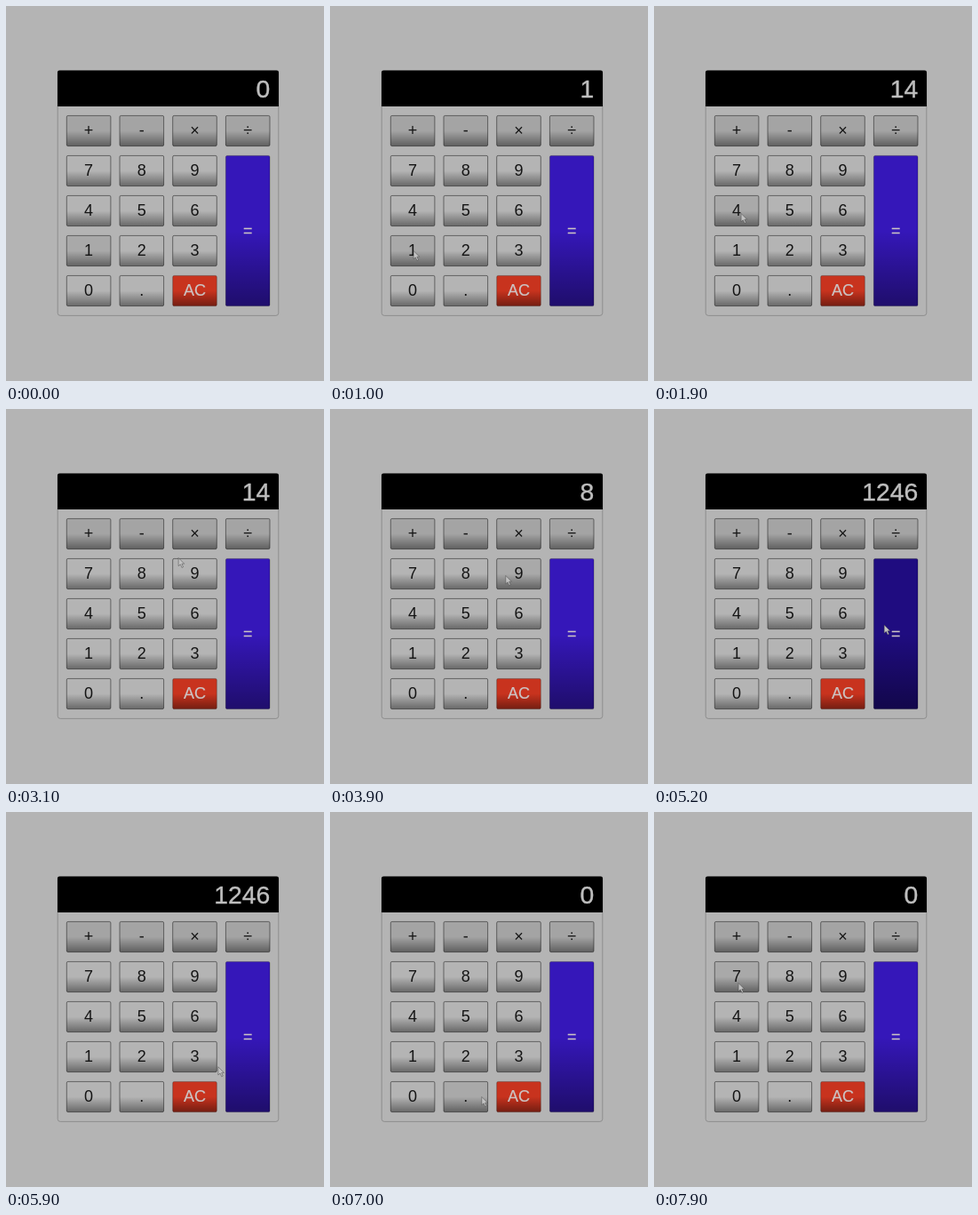
Write an HTML page that moves like this. It is 358 px wide and 422 px high and loops after 8 s.

```html
<!DOCTYPE html>
<html lang="en">
<head>
<meta charset="utf-8">
<title>Calculator</title>
<style>
html, body { margin: 0; width: 100%; height: 100%; overflow: hidden; background: #b4b4b4; }
svg { display: block; width: 358px; height: 422px; }
text { font-family: "Liberation Sans", Arial, sans-serif; font-size: 18px; text-anchor: middle; fill: #151515; }
#display { font-size: 28.3px; text-anchor: end; fill: #bebebe; stroke: #bebebe; stroke-width: .4px; }
.edge { stroke: #000; stroke-opacity: .55; stroke-width: .85px; }
.light .edge { stroke-opacity: .3; }
.light text { fill: #ccc4c4; stroke: #ccc4c4; stroke-width: .2px; }
</style>
</head>
<body>
<svg viewBox="0 0 358 422">
  <defs>
    <linearGradient id="shade" x1="0" y1="0" x2="0" y2="1">
      <stop offset=".5" stop-color="#000" stop-opacity="0"/>
      <stop offset="1" stop-color="#000" stop-opacity=".42"/>
    </linearGradient>
  </defs>
  <rect width="358" height="422" fill="#b4b4b4"/>
  <rect x="58.2" y="73" width="248.6" height="275.4" rx="3" fill="#b4b4b4" stroke="#858585" stroke-width=".8"/>
  <path d="M58 113V74.5q0-2 2-2h245q2 0 2 2V113z" fill="#000"/>
  <text id="display" x="297.2" y="102.8"></text>
  <g id="keys"></g>
  <path id="cursor" d="M0 0V9.2L2.2 7.3L3.9 11L5.4 10.3L3.8 6.7H6.6z"
        fill="#c2c2c2" stroke="#333" stroke-opacity=".7" stroke-width=".6" stroke-linejoin="round"/>
</svg>
<script>
const LOOP = 8000, STEP = 100, SHOW_CURSOR = 600;
const NS = "http://www.w3.org/2000/svg";
const $ = id => document.getElementById(id);

// face colour: idle, hovered
const colors = {
  digit: ["#b4b4b4", "#a9a9a9"],
  op: ["#a4a4a4", "#a4a4a4"],
  clear: ["#c8331e", "#8e2415"],
  equal: ["#3517b9", "#1f0c80"]
};

function add(parent, tag, attrs) {
  const node = document.createElementNS(NS, tag);
  for (const name in attrs) node.setAttribute(name, attrs[name]);
  return parent.appendChild(node);
}

const keys = {};

function makeKey(label, col, row, type, rows = 1) {
  const x = 68.3 + col * 59.7, y = 123.4 + row * 45;
  const w = 49.6, h = 34.2 + (rows - 1) * 45;
  const cx = x + w / 2, cy = y + h / 2;
  const light = type === "clear" || type === "equal";
  const g = add($("keys"), "g", { class: light ? "light" : "" });
  const box = { x, y, width: w, height: h, rx: 1.5 };
  const face = add(g, "rect", box);
  add(g, "rect", { ...box, class: "edge", fill: "url(#shade)" });
  add(g, "text", { x: cx, y: cy + 5.6 }).textContent = label;
  const contains = (px, py) => Math.abs(px - cx) <= w / 2 && Math.abs(py - cy) <= h / 2;
  keys[label] = { cx, cy, face, type, contains };
}

["+-×÷", "789", "456", "123", "0."].forEach((line, row) =>
  [...line].forEach((label, col) => makeKey(label, col, row, row ? "digit" : "op")));
makeKey("AC", 2, 4, "clear");
makeKey("=", 3, 1, "equal", 4);

// The pointer rests on a key, off its centre by dx and dy, between arrive and leave.
const stop = (label, dx, dy, arrive, leave, press) =>
  ({ label, x: keys[label].cx + dx, y: keys[label].cy + dy, arrive, leave, press });

const stops = [
  stop("1", 1, 0, 0, 1500, 900),
  stop("4", 5, 3, 1900, 2100, 1900),
  stop("×", 0, 7, 2800, 3000, 2800),
  stop("8", 23, 2, 3200, 3700, 3400),
  stop("9", -7, 2, 4000, 4100, 4000),
  stop("=", -13, -10, 4400, 5700, 4900),
  stop("AC", 6, 10, 6100, 6800, 6300),
  stop(".", 18, 0, 7000, 7100),
  stop("7", 2, 7, 7900, LOOP)
];

function pointerAt(t) {
  const i = stops.findIndex(s => t <= s.leave);
  const to = stops[i], from = stops[i - 1] || to;
  const k = t >= to.arrive ? 1 : (t - from.leave) / (to.arrive - from.leave);
  const e = k * k * (3 - 2 * k);
  return [from.x + (to.x - from.x) * e, from.y + (to.y - from.y) * e];
}

const operate = {
  "+": (a, b) => a + b,
  "-": (a, b) => a - b,
  "×": (a, b) => a * b,
  "÷": (a, b) => a / b
};

function displayAt(t) {
  let shown = "0", stored = 0, op = null, fresh = true;
  for (const { label, press } of stops) {
    if (!(press <= t)) continue;
    if (label === "AC") {
      shown = "0";
      op = null;
      fresh = true;
    } else if (label === "=") {
      shown = String(operate[op](stored, Number(shown)));
    } else if (operate[label]) {
      stored = Number(shown);
      op = label;
      fresh = true;
    } else {
      shown = fresh ? label : shown + label;
      fresh = false;
    }
  }
  return shown;
}

function render(ms) {
  const t = Math.floor((ms % LOOP) / STEP) * STEP;
  const [x, y] = pointerAt(t);
  for (const key of Object.values(keys)) {
    key.face.setAttribute("fill", colors[key.type][key.contains(x, y) ? 1 : 0]);
  }
  $("display").textContent = displayAt(t);
  $("cursor").setAttribute("transform", `translate(${x} ${y})`);
  $("cursor").setAttribute("visibility", t < SHOW_CURSOR ? "hidden" : "visible");
}

const start = performance.now();
function tick() {
  render(performance.now() - start);
  requestAnimationFrame(tick);
}
tick();
</script>
</body>
</html>
```
